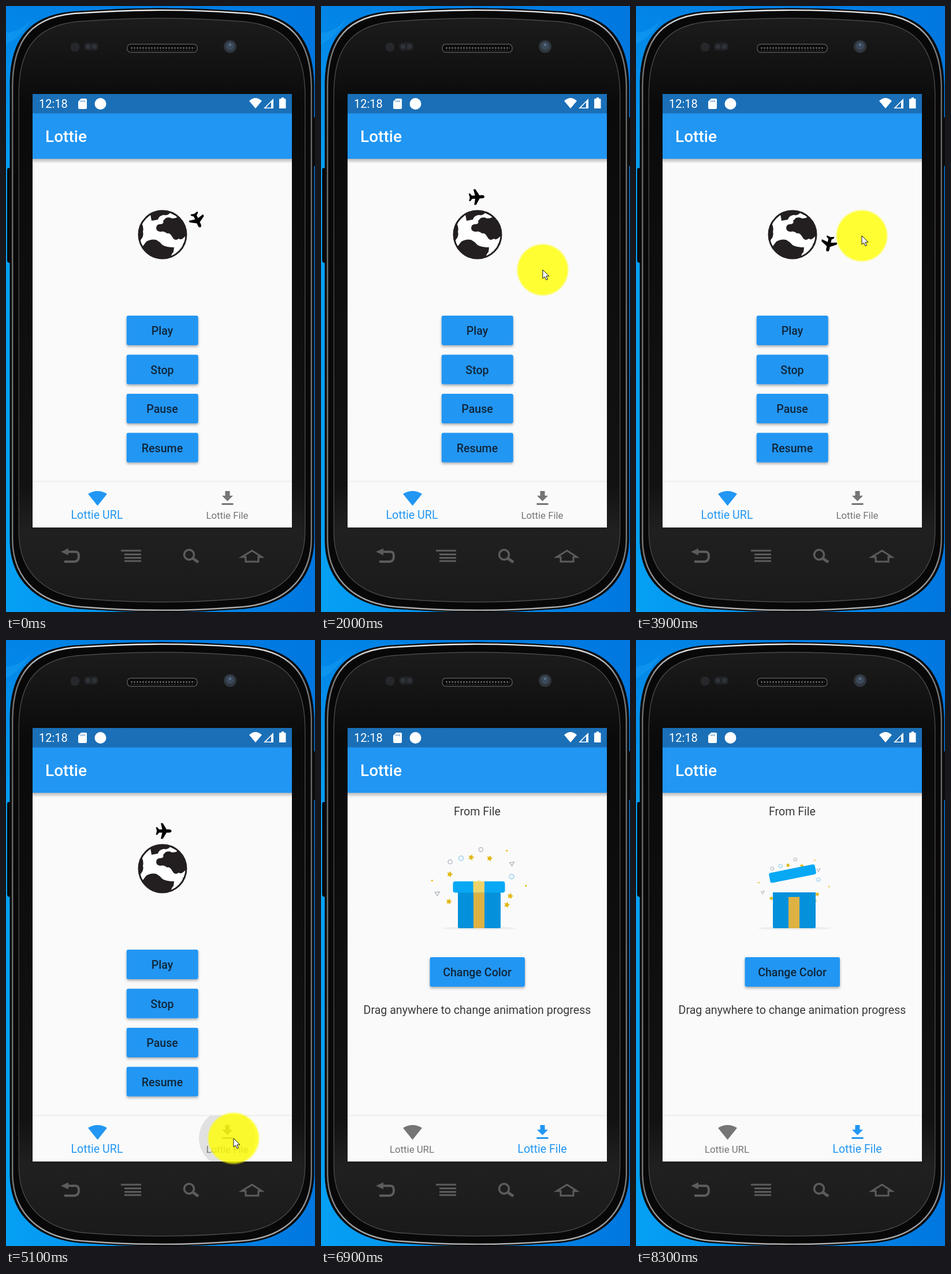
Recreate the animation shown at these times as an HTML page. Size 535 by 1047 pixels, loop 8400 ms.

```html
<!DOCTYPE html>
<html lang="en">
<head>
<meta charset="utf-8">
<title>Lottie demo</title>
<style>
html, body { margin: 0; width: 100%; height: 100%; overflow: hidden; background: #0a8fec; }
svg { display: block; width: 535px; height: 1047px; font-family: Roboto, sans-serif; }
.mid { text-anchor: middle; }
.btn { font-size: 19.6px; font-weight: 500; fill: #10263a; }
.body { font-size: 19.6px; fill: #3a3a3a; }
.inset { transform-origin: 270px 525px; }
</style>
</head>
<body>
<svg viewBox="0 0 535 1047">
  <defs>
    <linearGradient id="desk"><stop stop-color="#05a0f4"/><stop offset="1" stop-color="#0077df"/></linearGradient>
    <linearGradient id="deskTop" x2="0" y2="1"><stop stop-color="#0078e0" stop-opacity=".7"/><stop offset=".3" stop-color="#0078e0" stop-opacity="0"/></linearGradient>
    <linearGradient id="case" x2="0" y2="1"><stop stop-color="#1c1c1c"/><stop offset=".15" stop-color="#0a0a0a"/><stop offset=".8" stop-color="#121212"/><stop offset=".88" stop-color="#202020"/><stop offset="1" stop-color="#1a1a1a"/></linearGradient>
    <linearGradient id="rim" x2="0" y2="1"><stop stop-color="#eee"/><stop offset=".06" stop-color="#777"/><stop offset=".2" stop-color="#666"/><stop offset=".9" stop-color="#777"/><stop offset="1" stop-color="#b0b0b0"/></linearGradient>
    <linearGradient id="drop" x2="0" y2="1"><stop stop-opacity=".26"/><stop offset="1" stop-opacity="0"/></linearGradient>
    <radialGradient id="glow"><stop offset=".91" stop-color="#ff0" stop-opacity=".8"/><stop offset="1" stop-color="#ff0" stop-opacity="0"/></radialGradient>
    <pattern id="mesh" width="5" height="5" patternUnits="userSpaceOnUse"><circle cx="2.5" cy="2.5" r="1.5" fill="#666"/></pattern>
    <filter id="lift" x="-10%" y="-20%" width="120%" height="150%"><feDropShadow dx="0" dy="2.5" stdDeviation="2" flood-opacity=".32"/></filter>
    <clipPath id="globeClip"><circle cx="271" cy="395" r="42"/></clipPath>
    <clipPath id="navClip"><path d="M46 822H495V901H46Z"/></clipPath>
    <path id="shell" d="M7 135C8 56 40 12 130 9Q270-1 405 9C497 12 531 56 533 135V925C531 996 482 1039 400 1042Q270 1052 140 1042C58 1039 8 996 7 925Z"/>
  </defs>

  <path fill="url(#desk)" d="M0 0H535V1047H0Z"/>
  <path fill="url(#deskTop)" d="M0 0H535V1047H0Z"/>
  <path fill="#2bb2ff" opacity=".25" d="M0 46Q25 45 44 23Q27 53 0 66Z"/>

  <path fill="#080808" d="M8 280H4Q2 280 2 284V440Q2 444 8 444ZM531 192H533Q536 192 536 197V273Q536 277 531 277Z"/>
  <use href="#shell" fill="#080808" stroke="#111"/>
  <use class="inset" href="#shell" fill="none" stroke="url(#rim)" stroke-width="2.5" transform="scale(.984 .994)"/>
  <use class="inset" href="#shell" fill="url(#case)" stroke="#484848" stroke-width="1.5" transform="scale(.942 .967)"/>

  <rect x="210" y="66" width="121" height="14" rx="6" fill="#0a0a0a" stroke="#555" stroke-width="1.5"/>
  <rect x="214" y="69" width="113" height="8" rx="4" fill="url(#mesh)"/>
  <circle cx="119.5" cy="71" r="8" fill="#25272b"/>
  <rect x="135" y="63" width="25" height="14" rx="6" fill="#202225"/>
  <circle cx="142" cy="70" r="4" fill="#30343a"/><rect x="149" y="66" width="8" height="8" rx="2" fill="#2e3238"/>
  <circle cx="388" cy="70" r="11" fill="#30363d"/><circle cx="388" cy="69" r="7" fill="#3b4a5b"/><circle cx="388" cy="67" r="2" fill="#60758a"/>

  <g fill="none" stroke="#5c5c5c" stroke-width="4">
    <path d="M104 943H121Q126 943 126 951T119 960H101"/>
    <path stroke-width="2.8" d="M199 941H234M205 947.5H234M205 953.5H234M205 959H234"/>
    <circle cx="317" cy="948" r="8.5" stroke-width="3.5"/><path stroke-width="5" d="M323 954L333 961"/>
    <path stroke-width="3" d="M408 952L426 941L443 952H437V960H415V952Z"/>
  </g>
  <path fill="#5c5c5c" d="M95 943L108 937V949Z"/>

  <path fill="#fafafa" d="M46 152H495V901H46Z"/>
  <path fill="url(#drop)" d="M46 264H495V272H46Z"/>
  <path fill="#2196f3" d="M46 185H495V264H46Z"/>
  <path fill="#1a6fb7" d="M46 152H495V185.5H46Z"/>
  <g fill="#fff">
    <text x="57" y="176" font-size="20">12:18</text>
    <text x="68" y="235" font-size="28" font-weight="500">Lottie</text>
    <path d="M130 160H138Q140 160 140 162V176Q140 178 138 178H127Q125 178 125 176V165Z"/>
    <circle cx="163.5" cy="169" r="10"/>
    <path d="M421 164Q432 154 443 164L432 177ZM474.5 160H477V158H481V160H483Q484.5 160 484.5 161.5V177H473V161.5Q473 160 474.5 160Z"/>
    <path d="M446 177L463 160V177Z"/>
  </g>
  <path fill="#1a6fb7" d="M450 175.5L459 166V175.5Z"/>
  <path stroke="#1a6fb7" d="M130 163V166M133 163V166M136 163V166"/>

  <g id="urlPage">
    <g clip-path="url(#globeClip)" fill="#231f20">
      <circle cx="271" cy="395" r="42" fill="#fff"/>
      <path d="M250 360Q267 349 285 356Q281 363 273 361Q265 362 263 369L252 371Z"/>
      <path d="M228 383L235 376Q239 382 237 390Q239 397 234 403L230 410Z"/>
      <path d="M277 366Q284 364 287 367Q296 367 301 362L316 378V398Q311 396 308 400Q304 405 299 402Q292 407 288 399Q283 391 279 393Q273 388 268 390Q260 390 260 383Q261 376 268 377Q274 376 272 371Z"/>
      <path d="M234 419Q239 412 243 407Q251 402 260 404Q266 407 271 413Q278 417 291 417L290 425Q285 429 286 438H245Z"/>
      <path d="M306 411Q311 407 315 409L309 416Z"/>
    </g>
    <circle cx="271" cy="395" r="41" fill="none" stroke="#231f20" stroke-width="3"/>
    <path id="plane" d="M14 0Q14-2.8 10-2.8H5.5L-1-13.5H-4.5L-2-2.8H-7.5L-10.5-6.5H-13L-11.3 0L-13 6.5H-10.5L-7.5 2.8H-2L-4.5 13.5H-1L5.5 2.8H10Q14 2.8 14 0Z"/>
  </g>

  <g id="filePage">
    <text class="body mid" x="270.5" y="303">From File</text>
    <ellipse cx="274" cy="498" rx="63" ry="3" fill="#ededed"/>
    <g id="confetti"></g>
    <g id="giftBox">
      <path fill="#0491dc" d="M237 436H311V496Q311 498 309 498H239Q237 498 237 496Z"/>
      <path id="boxRibbon" fill="#deb242"/>
    </g>
    <g id="lid">
      <rect x="-45" y="-9.5" width="90" height="19.5" rx="4" fill="#08a8f5"/>
      <g id="lidRibbon">
        <path fill="#efd369" d="M-10-9.5H9.5V10H-10Z"/>
        <path id="bow" fill="none" stroke="#eed778" stroke-width="5" d="M0 0C-9-22-30-15-20-4Q-14 1 0 0C9-22 30-15 20-4Q14 1 0 0"/>
      </g>
    </g>
    <text class="body mid" x="270.5" y="646">Drag anywhere to change animation progress</text>
  </g>

  <path fill="#f1f1f1" d="M46 820H495V823H46Z"/>
  <path fill="#fafafa" d="M46 823H495V901H46Z"/>
  <circle id="ripple" cx="383" cy="861" clip-path="url(#navClip)"/>
  <g id="urlTab" class="mid">
    <path d="M142 843Q158.500 833 175 843L158.500 863.500Z"/>
    <text x="157.500" y="886">Lottie URL</text>
  </g>
  <g id="fileTab" class="mid">
    <path d="M379.500 838H387.500V846H393L383.500 855.500L374 846H379.500ZM373.500 859H393.500V862H373.500Z"/>
    <text x="383" y="886">Lottie File</text>
  </g>

  <g id="pointer">
    <circle r="46" fill="url(#glow)"/>
    <path d="M0 0V15L3.5 12L6 17.500L8.500 16.500L6 11H11Z" fill="#fff" stroke="#111"/>
  </g>
</svg>

<script>
const LOOP = 8400, STEP = 100, TAB_SWITCH = 5300;
const GIFT_CYCLE = 1800, LID_PEAK = 6400;
const $ = id => document.getElementById(id);
const clamp = v => Math.min(1, Math.max(0, v));
const show = (node, on) => { node.style.display = on ? '' : 'none'; };
const move = (node, value) => node.setAttribute('transform', value);

function add(parent, tag, attrs, text = '') {
  const node = document.createElementNS('http://www.w3.org/2000/svg', tag);
  for (const key in attrs) node.setAttribute(key, attrs[key]);
  node.textContent = text;
  return parent.appendChild(node);
}

function addButton(page, label, y, width) {
  add(page, 'rect', { x: 270.75 - width / 2, y, width, height: 51, rx: 3, fill: '#2196f3', filter: 'url(#lift)' });
  add(page, 'text', { x: 270.5, y: y + 33, class: 'btn mid' }, label);
}
['Play', 'Stop', 'Pause', 'Resume'].forEach((label, i) => addButton($('urlPage'), label, 535 + i * 67.5, 124));
addButton($('filePage'), 'Change Color', 548, 164.5);

// Confetti fans out evenly around the gift; each kind has its own reach.
const outline = color => ({ fill: 'none', stroke: color, 'stroke-width': 1.4 });
const star = r => Array.from({ length: 10 }, (_, i) => {
  const a = i * Math.PI / 5 - 1.3, d = i % 2 ? r / 2 : r;
  return [d * Math.cos(a), d * Math.sin(a)];
}).join(' ');
const kinds = {
  star: { reach: 56, tag: 'polygon', attrs: { points: star(5.5), fill: '#e0b816' } },
  ring: { reach: 68, tag: 'circle', attrs: { r: 3.6, ...outline('#b3b9c2') } },
  bubble: { reach: 61, tag: 'circle', attrs: { r: 4, ...outline('#8fcdf0') } },
  triangle: { reach: 72, tag: 'path', attrs: { d: 'M-4-2L4-3L0 4Z', ...outline('#b3b9c2') } },
  dot: { reach: 82, tag: 'circle', attrs: { r: 1.6, fill: '#e5bd18' } }
};
const pieces = 'star triangle dot star ring bubble star ring star dot triangle bubble dot star star'
  .split(' ').map((name, i) => {
    const { reach, tag, attrs } = kinds[name], angle = (16.6 * i - 203) * Math.PI / 180;
    return { dx: reach * Math.cos(angle), dy: reach * Math.sin(angle), node: add($('confetti'), tag, attrs) };
  });

// One lap out and one lap back around the globe.
function drawPlane(t) {
  const TURN = 2070, LAP = 2775;
  const u = clamp(Math.abs(t - TURN) / LAP);
  const eased = .7 * (1 - Math.cos(Math.PI * u)) / 2 + .3 * u;
  move($('plane'), `translate(271 395) rotate(${-360 * eased}) translate(1.5 -65)`);
}

function drawGift(t) {
  const phase = (t - LID_PEAK + GIFT_CYCLE) % GIFT_CYCLE;
  const open = clamp(1 - Math.min(phase, GIFT_CYCLE - phase) / 300);
  move($('lid'), `translate(${273.5 - 3.7 * open} ${426.5 - 52 * open ** 2}) rotate(${-17 * open}) scale(${1 - .15 * open})`);
  $('lidRibbon').setAttribute('opacity', clamp(1 - 2 * open));
  move($('bow'), `translate(0 -10) scale(${clamp((phase - 450) / 400)})`);

  const squash = .06 * clamp(1 - Math.abs(phase - 1400) / 150);
  move($('giftBox'), `translate(274 498) scale(${1 + squash} ${1 - squash}) translate(-274 -498)`);
  $('boxRibbon').setAttribute('d', `M264 ${open ? 444 : 436}H283V498H264Z`);

  const spread = (phase / 500) ** .18;
  $('confetti').setAttribute('opacity', clamp((1100 - phase) / 300));
  for (const { dx, dy, node } of pieces)
    move(node, `translate(${273 + dx * spread} ${430 + dy * spread}) scale(${Math.min(1, spread)})`);
}

function setTab(tab, active) {
  tab.setAttribute('fill', active ? '#2196f3' : '#757575');
  tab.setAttribute('font-size', active ? 19.6 : 16.8);
}

const stops = [
  { at: 1500, x: 640, y: 650 }, { at: 1800, x: 443, y: 456 }, { at: 2700, x: 177, y: 455 },
  { at: 3200, x: 300, y: 529 }, { at: 3600, x: 419, y: 425 }, { at: 3900, x: 391, y: 397 },
  { at: 4500, x: 394, y: 861 }, { at: 6500, x: 394, y: 861 }, { at: 6800, x: 620, y: 930 }
];
function drawPointer(t) {
  const i = stops.findIndex(stop => stop.at > t);
  show($('pointer'), i > 0);
  if (i < 1) return;
  const a = stops[i - 1], b = stops[i], u = (t - a.at) / (b.at - a.at);
  move($('pointer'), `translate(${a.x + (b.x - a.x) * u} ${a.y + (b.y - a.y) * u})`);
}

function drawRipple(t) {
  $('ripple').setAttribute('r', 49 * clamp((t - 4800) / 300));
  $('ripple').setAttribute('opacity', .1 * clamp((5400 - t) / 300));
}

function draw(t) {
  const onFile = t >= TAB_SWITCH;
  show($('urlPage'), !onFile);
  show($('filePage'), onFile);
  setTab($('urlTab'), !onFile);
  setTab($('fileTab'), onFile);
  if (onFile) drawGift(t); else drawPlane(t);
  drawRipple(t);
  drawPointer(t);
}

const start = performance.now();
function tick() {
  const t = (performance.now() - start) % LOOP;
  draw(Math.floor(t / STEP) * STEP);
  requestAnimationFrame(tick);
}
tick();
</script>
</body>
</html>
```
